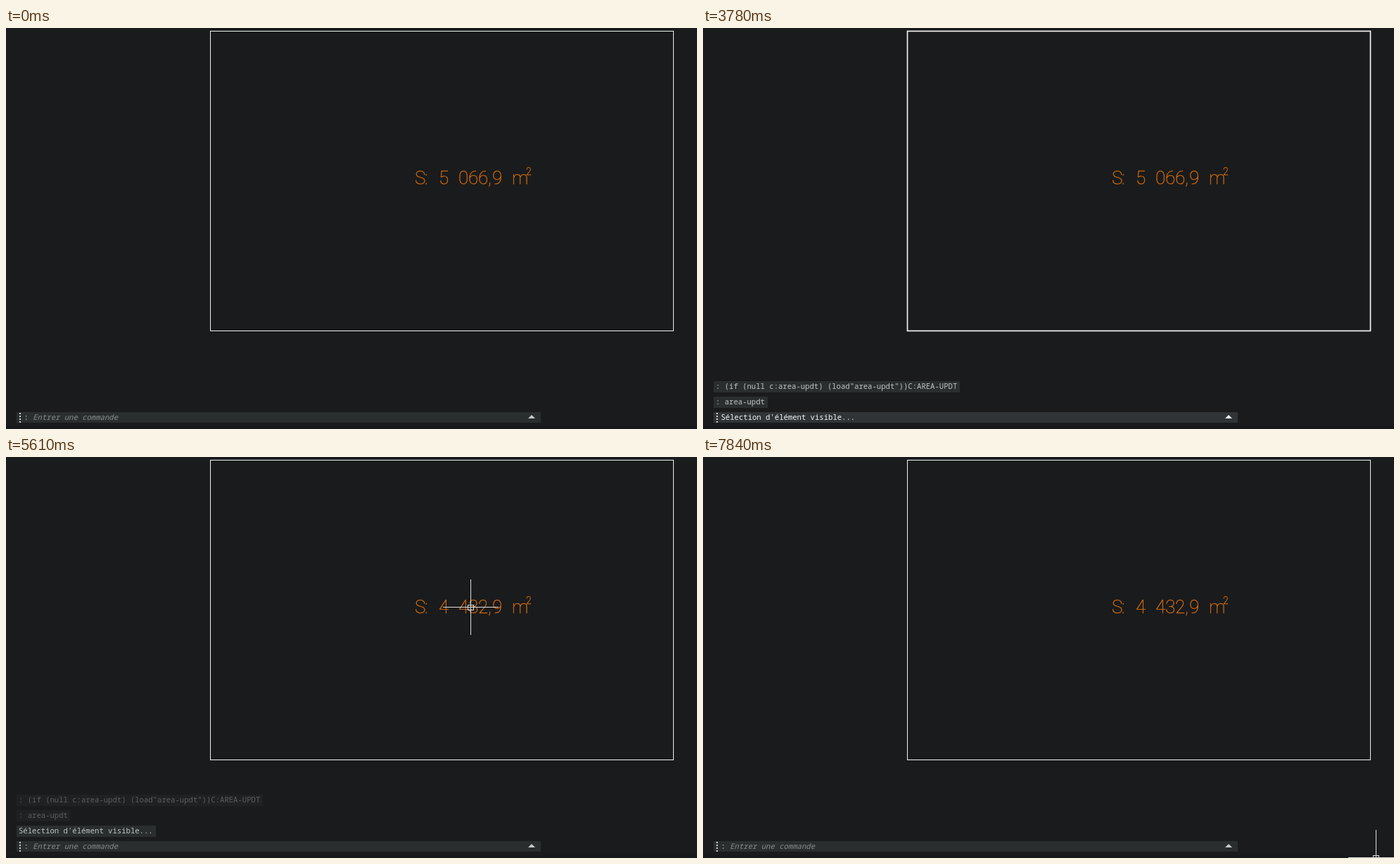
An HTML page that plays this animation: 982x570 px, repeating every 7940 ms.

```html
<!DOCTYPE html>
<html lang="fr">
<head>
<meta charset="utf-8">
<title>Mise à jour de superficie</title>
<style>
  html, body { margin: 0; width: 100%; height: 100%; overflow: hidden; background: #1a1b1c; }
  #stage { position: relative; width: 982px; height: 570px; overflow: hidden; background: #1a1b1c; }
  svg { position: absolute; inset: 0; }
  .strip { position: absolute; left: 0; top: 566px; width: 982px; height: 4px; background: #17181b; }

  #fill { fill: #5b5c5d; }
  #plot { fill: none; stroke: #f2f2f2; }
  #area { font: 100 26px Roboto, sans-serif; fill: #e0730f; stroke: #e0730f; stroke-width: .35px; }
  #cross, #box { fill: none; stroke: #dedede; }
  #box.pick { stroke: #9fb6c3; }

  #log, #bar { font: 10.6px/14px "Noto Sans Mono", "DejaVu Sans Mono", monospace; white-space: pre; }
  #log {
    position: absolute; left: 15px; top: 400px; height: 140px;
    display: flex; flex-direction: column; justify-content: flex-end; align-items: flex-start; gap: 6px;
  }
  #log div { height: 16px; padding: 0 4px 0 3px; flex: none; }
  .l0 { color: #c0c4c4; background: #2a2e2f; }
  .l1 { color: #8e9192; background: #232627; }
  .l2 { color: #5c5f60; background: #1f2122; }
  .l3 { color: #37393a; }

  #bar { position: absolute; left: 15px; top: 546px; width: 745px; height: 15px; background: #2a2e2f; color: #c4c8c8; }
  #bar.on { background: #303437; color: #f4f4f4; }
  #bar i { color: #8b8e8f; }
  #bar.on i { color: #b3b6b7; }
  #bar::before {
    content: ""; position: absolute; left: 4px; top: 1px; width: 2px; height: 14px;
    background: repeating-linear-gradient(#d8d8d8 0 2px, transparent 2px 4px);
  }
  #bar::after {
    content: ""; position: absolute; left: 727px; top: 4px;
    border: solid transparent; border-width: 0 5px 5px; border-bottom-color: currentColor;
  }
  #prompt { position: absolute; left: 10.5px; top: 0; }
</style>
</head>
<body>
<div id="stage">
  <div class="strip"></div>
  <svg width="982" height="570">
    <rect id="fill" x="291" y="5" width="657" height="425"/>
    <rect id="plot" x="290.5" y="4.5" width="658" height="426"/>
    <text id="area" y="222">
      <tspan x="581 595">S:</tspan>
      <tspan id="kilo" x="615"></tspan>
      <tspan id="rest" x="643 657 671 685 691"></tspan>
      <tspan x="719">m</tspan><tspan x="739" y="209" font-size="14">2</tspan>
    </text>
    <path id="cross" d="M-39 .5H40M.5 -39V40"/>
    <rect id="box" x="-3.5" y="-2.5" width="8" height="7"/>
  </svg>
  <div id="log"></div>
  <div id="bar"><span id="prompt"></span></div>
</div>
<script>
const LOOP = 7940;
const $ = id => document.getElementById(id);

const IDLE = ': <i>Entrer une commande</i>';
const LOAD = ': (if (null c:area-updt) (load"area-updt"))C:AREA-UPDT';
const NAME = ': area-updt';
const SELECT = "Sélection d'élément visible...";
const UPDATE = 'Superficie mise a jour:';
const RESULT = '4432.9 m2 , 47715.2 pi2 - FC: NIL';

// Each step overrides the previous one; log rows are [text, fade level].
const steps = [
  { t: 0, on: false, prompt: IDLE, log: [], area: '5 066,9', fill: false, bold: false },
  { t: 2370, on: true },
  { t: 2460, prompt: '', log: [[LOAD, 0], [NAME, 0]] },
  { t: 3780, prompt: SELECT, bold: true },
  { t: 3810, prompt: UPDATE, log: [[LOAD, 1], [NAME, 1], [SELECT, 0]], fill: true, bold: false },
  { t: 5300, log: [[LOAD, 1], [NAME, 2], [SELECT, 0]] },
  { t: 5520, log: [[LOAD, 2], [NAME, 2], [SELECT, 0]] },
  { t: 5550, fill: false },
  { t: 5580, area: '4 432,9', on: false, prompt: IDLE },
  { t: 5640, log: [[NAME, 2], [SELECT, 0], [UPDATE, 0]] },
  { t: 5670, log: [[NAME, 3], [SELECT, 1], [UPDATE, 0], [RESULT, 0]] },
  { t: 5890, log: [[SELECT, 1], [UPDATE, 0], [RESULT, 0]] },
  { t: 7580, log: [[SELECT, 2], [UPDATE, 0], [RESULT, 0]] },
  { t: 7760, log: [[SELECT, 3], [UPDATE, 1], [RESULT, 1]] },
  { t: 7800, log: [[UPDATE, 2], [RESULT, 2]] },
  { t: 7840, log: [] }
];
steps.forEach((s, i) => { steps[i] = { ...steps[i - 1], ...s }; });

// Cursor phases; keys are [time, x, y].
const phases = [
  { from: 2460, to: 3780, cross: true, box: false, keys: [[2460, 806, -36], [3160, 714, 146]] },
  { from: 3840, to: 5520, cross: false, box: true,
    keys: [[4260, 714, 146], [4870, 671, 212], [5040, 661, 213], [5100, 660, 213]] },
  { from: 5610, to: LOOP, cross: true, box: true,
    keys: [[6050, 660, 213], [6570, 730, 307], [6840, 865, 452], [7420, 956, 569]] }
];

const slope = (a, b, k) => (b[k] - a[k]) / (b[0] - a[0]);

// Monotone tangent: harmonic mean of both sides, zero at the ends.
function tangent(keys, i, k) {
  if (i === 0 || i === keys.length - 1) return 0;
  const a = slope(keys[i - 1], keys[i], k), b = slope(keys[i], keys[i + 1], k);
  return a * b > 0 ? 2 * a * b / (a + b) : 0;
}

function along(keys, t, k) {
  const last = keys.length - 1;
  if (t <= keys[0][0]) return keys[0][k];
  if (t >= keys[last][0]) return keys[last][k];
  const i = keys.findIndex(key => key[0] > t) - 1;
  const a = keys[i], b = keys[i + 1], d = b[0] - a[0], u = (t - a[0]) / d;
  const h = u * u * (3 - 2 * u);
  return a[k] + (b[k] - a[k]) * h
    + d * tangent(keys, i, k) * u * (1 - u) * (1 - u)
    - d * tangent(keys, i + 1, k) * u * u * (1 - u);
}

function showStep(s) {
  $('bar').className = s.on ? 'on' : '';
  $('prompt').innerHTML = s.prompt;
  $('log').replaceChildren(...s.log.map(([text, level]) => {
    const row = document.createElement('div');
    row.className = 'l' + level;
    row.textContent = text;
    return row;
  }));
  [$('kilo').textContent, $('rest').textContent] = s.area.split(' ');
  $('fill').style.display = s.fill ? '' : 'none';
  $('plot').style.strokeWidth = s.bold ? 1.7 : 1;
}

function showCursor(t) {
  const p = phases.find(p => t >= p.from && t < p.to);
  $('cross').style.display = p && p.cross ? '' : 'none';
  $('box').style.display = p && p.box ? '' : 'none';
  if (!p) return;
  const move = `translate(${Math.round(along(p.keys, t, 1))} ${Math.round(along(p.keys, t, 2))})`;
  $('cross').setAttribute('transform', move);
  $('box').setAttribute('transform', move);
  $('box').classList.toggle('pick', !p.cross);
}

let shown;
const start = performance.now();
function draw() {
  const t = (performance.now() - start) % LOOP;
  const s = steps.findLast(s => s.t <= t);
  if (s !== shown) showStep(shown = s);
  showCursor(t);
  requestAnimationFrame(draw);
}
draw();
</script>
</body>
</html>
```
